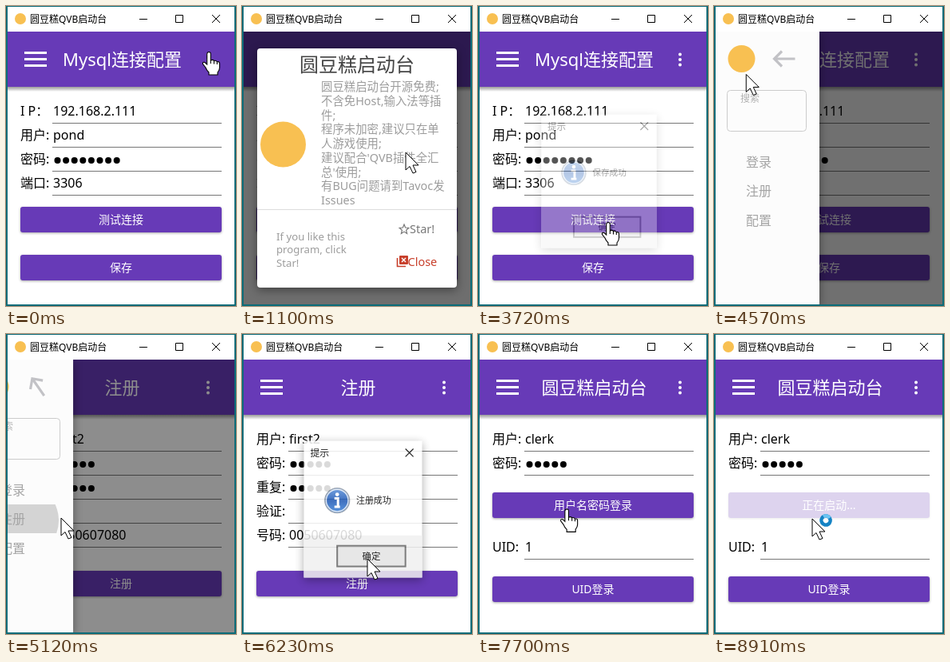
Recreate the animation shown at these times as an HTML page. Size 288 by 375 pixels, loop 9000 ms.

```html
<!DOCTYPE html>
<html lang="zh-CN">
<head>
<meta charset="utf-8">
<title>圆豆糕启动台</title>
<style>
html, body { margin: 0; width: 100%; height: 100%; overflow: hidden; background: #0b6b78; }
svg { display: block; width: 288px; height: 375px; }
text { font-family: "Noto Sans", "Noto Sans CJK SC", "Noto Sans CJK", sans-serif; white-space: pre; }
.btn { filter: drop-shadow(0 1.5px 1.5px rgba(0,0,0,.35)); }
.card { filter: drop-shadow(0 3px 6px rgba(0,0,0,.4)); }
</style>
</head>
<body>
<svg id="stage" viewBox="0 0 288 375"></svg>
<script>
const LOOP = 9000, FIRST = 170, STEP = 92.98;
const PURPLE = '#673ab7', YELLOW = '#f8c052', DRAWER_W = 132;

// ---- markup helpers ----
const text = (x, y, size, fill, str, extra = '') =>
  `<text x="${x}" y="${y}" font-size="${size}" fill="${fill}" ${extra}>${str}</text>`;
const mid = 'text-anchor="middle"', medium = 'font-weight="500"';
const rect = (x, y, w, h, fill, extra = '') =>
  `<rect x="${x}" y="${y}" width="${w}" height="${h}" fill="${fill}" ${extra}/>`;
const circle = (x, y, r, fill, extra = '') =>
  `<circle cx="${x}" cy="${y}" r="${r}" fill="${fill}" ${extra}/>`;
const line = (d, stroke, w = 1, extra = '') =>
  `<path d="${d}" fill="none" stroke="${stroke}" stroke-width="${w}" ${extra}/>`;
const group = (id, inner, extra = '') => `<g id="${id}" ${extra}>${inner}</g>`;

// A number as value means that many password bullets.
function field(label, value, y) {
  let body = '';
  if (typeof value === 'number') {
    for (let i = 0; i < value; i++) body += circle(64.5 + i * 10.6, y - 13, 4, '#000');
  } else body = text(59, y - 9, 16, '#000', value);
  return text(18, y - 9, 16, '#000', label) + body + rect(58, y, 212, 1, '#777');
}
const button = (id, y, label) => `<g class="btn" id="${id}">` +
  rect(18, y, 252, 32, PURPLE, 'rx="3"') + '</g>' +
  text(144, y + 21, 14, '#fff', label, mid + ` id="${id}Text"`);

const pages = {
  config: {
    title: 'Mysql连接配置',
    buttons: [251, 311],
    body: field('I P：', '192.168.2.111', 146) + field('用户:', 'pond', 176) +
      field('密码:', 8, 206) + field('端口:', '3306', 236) +
      button('test', 251, '测试连接') + button('save', 311, '保存')
  },
  register: {
    title: '注册',
    buttons: [296],
    body: field('用户:', 'first2', 146) + field('密码:', 5, 176) + field('重复:', 5, 206) +
      field('验证:', '', 236) + field('号码:', '0050607080', 266) + button('join', 296, '注册')
  },
  home: {
    title: '圆豆糕启动台',
    buttons: [198, 303],
    body: field('用户:', 'clerk', 146) + field('密码:', 5, 176) +
      button('login', 198, '用户名密码登录') + field('UID:', '1', 281) + button('uid', 303, 'UID登录')
  }
};

const notes = ['圆豆糕启动台开源免费;', '不含免Host,输入法等插', '件;', '程序未加密,建议只在单',
  '人游戏使用;', "建议配合'QVB插件全汇", "总'使用;", '有BUG问题请到Tavoc发', 'Issues'];

const about = `<g class="card">${rect(19, 53, 250, 299, '#fff', 'rx="4"')}</g>` +
  text(144, 82, 24, '#444', '圆豆糕启动台', mid) +
  circle(51.5, 173, 28.5, YELLOW) +
  notes.map((s, i) => text(99, 106 + i * 17.75, 14.4, '#9c9c9c', s)).join('') +
  rect(19, 254, 250, 1, '#ddd') +
  ['If you like this', 'program, click', 'Star!']
    .map((s, i) => text(43, 292.5 + i * 16.6, 13.2, '#9c9c9c', s)).join('') +
  line('M203 273l1.6 4 4.2 .4-3.200 2.800 1 4.200-3.600-2.300-3.600 2.300 1-4.200-3.200-2.800 4.200-.4z', '#777', 1.2) +
  text(210, 284, 14.5, '#777', 'Star!', medium) +
  rect(197, 312, 11, 11, '#c8402c', 'rx="1"') +
  line('M194.500 315V325.500H205', '#c8402c', 1.6) +
  line('M200 315l5 5m0-5l-5 5', '#fff', 1.4) +
  text(207.5, 325, 14.5, '#c8402c', 'Close', medium);

const rows = [['登录', 177], ['注册', 213], ['配置', 250]];
const drawer = `<g class="card">${rect(0, 32, DRAWER_W, 342, '#fcfcfc')}</g>` +
  circle(34.5, 66, 17, YELLOW) +
  group('back', line('M13.500 0H-12.500M-3-9.500L-12.500 0L-3 9.500', '#c2c2c6', 3.2)) +
  rect(16.5, 105.500, 99, 51, 'none', 'rx="4" stroke="#ccc"') +
  text(33, 120, 12, '#b0b0b0', '搜索') +
  `<clipPath id="row"><rect id="rowBox" x="8" width="116" height="36" rx="4"/></clipPath>` +
  `<g clip-path="url(#row)">${circle(0, 0, 0, '#d4d4d4', 'id="ripple"')}</g>` +
  rows.map(([s, y]) => text(40, y + 24, 16, '#a4a4a4', s)).join('');

const message = `<g class="card">${rect(77, 133, 149, 172, '#fff')}</g>` +
  rect(77, 252, 149, 53, '#f0f0f0') +
  text(85, 153, 12, '#000', '提示') + line('M205 143l10 10m0-10l-10 10', '#000', 1.2) +
  circle(119, 208, 15.5, 'url(#blue)', 'stroke="#8f9aa8" stroke-width="1.5"') +
  circle(119, 208, 13.9, 'none', 'stroke="#dfe8f4" stroke-width="1.4"') +
  circle(119, 200.5, 2.4, '#fff') +
  line('M115.500 205.500H120V215.500M115.500 216H122.500', '#fff', 3) +
  text(143, 212, 11, '#000', '', 'id="note"') +
  rect(119, 265, 86, 26, '#e3e3e3', 'stroke="#666" stroke-width="2"') +
  text(162, 282, 11.5, '#000', '确定', mid);

const pointer = line('M0 0V22L5 17.500L9 26L13 24.500L9 16H16Z', '#000', 1, 'id="arrow" style="fill:#fff"') +
  line('M-2.300 2Q-2-.5 0-.5Q2.300-.5 2.300 2V10Q5 8.500 6.500 10.500Q9 9.500 10.300 11.800Q13.500 11 13.500 14V19' +
    'Q13.500 22 11 25V28H0V25Q-3 22-4 19L-7.500 14.500Q-8 11.500-5 12.500L-2.300 15Z' +
    'M2.300 10V14M6.500 10.500V14.500M10.300 11.800V15', '#000', 1.1, 'id="hand" style="fill:#fff"') +
  group('spinner', circle(0, 0, 5.6, 'none', 'stroke="#1583c4" stroke-width="4.500"') +
    line('M0-5.600A5.600 5.600 0 0 1 5.600 0', '#6cc4f2', 4.5));

const stage = document.getElementById('stage');
stage.innerHTML = `<defs>
  <clipPath id="client"><rect x="2" y="32" width="284" height="341"/></clipPath>
  <linearGradient id="shade" x2="0" y2="1"><stop stop-opacity=".4"/><stop offset="1" stop-opacity="0"/></linearGradient>
  <linearGradient id="blue" x2="0" y2="1"><stop stop-color="#5d93dc"/><stop offset=".5" stop-color="#2059b4"/><stop offset="1" stop-color="#3f86dc"/></linearGradient>
  </defs>` +
  rect(0, 0, 288, 375, '#0b6b78') + rect(2, 1, 284, 372, '#fff') +
  circle(18, 16, 7, YELLOW) +
  group('frame', text(30, 21, 12, 'currentColor', '圆豆糕QVB启动台') +
    line('M167 16.500H177M212.500 11.500H221.500V20.500H212.500ZM258 11l10 10m0-10l-10 10', 'currentColor')) +
  '<g clip-path="url(#client)">' +
  Object.keys(pages).map(k => group(k, pages[k].body)).join('') +
  rect(2, 101, 284, 6, 'url(#shade)') + rect(2, 32, 284, 69, PURPLE) +
  line('M23 58.500H51M23 66.500H51M23 74.500H51', '#fff', 3) +
  text(145.5, 75, 22, '#fff', '', `${mid} ${medium} id="heading"`) +
  [60.5, 67, 73.5].map(y => circle(253, y, 2, '#fff')).join('') +
  rect(2, 32, 284, 341, '#000', 'id="scrim"') +
  group('about', about) + group('drawer', drawer) + '</g>' +
  group('message', message) + group('pointer', pointer);

const el = {};
stage.querySelectorAll('[id]').forEach(n => el[n.id] = n);
const set = (id, attrs) => { for (const k in attrs) el[id].setAttribute(k, attrs[k]); };
const show = (id, on) => { el[id].style.display = on ? '' : 'none'; };

// ---- timeline ----
const clamp = v => Math.max(0, Math.min(1, v));
const ramp = (t, start, dur) => clamp((t - start) / dur);
const smooth = p => p * p * (3 - 2 * p);

const path = [
  [0, 254, 58], [650, 254, 58], [1100, 205, 183], [1400, 215, 318], [1600, 215, 318],
  [2050, 160, 265], [2300, 160, 265], [2500, 157, 281], [2750, 157, 281],
  [3000, 150, 325], [3250, 150, 325], [3480, 163, 271], [3750, 163, 271],
  [4150, 36, 64], [4450, 36, 64], [4850, 69, 230], [5150, 69, 230],
  [5500, 145, 310], [5750, 145, 310], [6000, 157, 281], [6300, 157, 281],
  [6700, 36, 64], [6930, 36, 64], [7130, 57, 198], [7300, 57, 198],
  [7850, 123, 224], [8150, 123, 224], [8400, 123, 231], [9000, 123, 231]
];
const messages = [
  { open: 2200, close: 2680, note: '连接成功', btn: 'test' },
  { open: 3220, close: 3640, note: '保存成功', btn: 'save' },
  { open: 5640, close: 6200, note: '注册成功', btn: 'join' }
];
const menus = [
  { open: 4220, close: 4989, row: 1, x: 66 },
  { open: 6760, close: 7200, row: 0, x: 54 }
];
const ABOUT = { open: 350, close: 1500 }, LAUNCH = 8050, SLIDE_OUT = 300;

const isOpen = (t, e, tail = 0) => t >= e.open && t < e.close + tail;
const level = (t, e, inDur, outDur) => smooth(ramp(t, e.open, inDur)) * (1 - ramp(t, e.close, outDur));

function pointerAt(t) {
  let i = 1;
  while (i < path.length - 1 && path[i][0] < t) i++;
  const a = path[i - 1], b = path[i], p = smooth(ramp(t, a[0], b[0] - a[0]));
  return [a[1] + (b[1] - a[1]) * p, a[2] + (b[2] - a[2]) * p];
}

function isHand(t, x, y, page) {
  if (messages.some(m => isOpen(t, m)) || menus.some(m => isOpen(t, m, SLIDE_OUT))) return false;
  if (isOpen(t, ABOUT)) return x > 190 && x < 250 && y > 305 && y < 332;
  if (y > 45 && y < 88) return x < 58 || x > 235;
  return x > 18 && x < 270 && pages[page].buttons.some(b => y >= b && y < b + 32);
}

function draw(t) {
  const page = t < menus[0].close ? 'config' : t < menus[1].close ? 'register' : 'home';
  for (const k in pages) show(k, k === page);
  el.heading.textContent = pages[page].title;

  const a = level(t, ABOUT, 150, 90), s = .8 + .2 * a;
  show('about', a > 0);
  set('about', { opacity: a, transform: `translate(144 202) scale(${s}) translate(-144 -202)` });

  const menu = t < 6000 ? menus[0] : menus[1];
  const d = level(t, menu, 250, SLIDE_OUT), off = (1 - d) * DRAWER_W;
  show('drawer', d > 0);
  set('drawer', { transform: `translate(${-off} 0)` });
  set('back', { transform: `translate(88 66) rotate(${off * 1.15})` });
  const rowY = rows[menu.row][1];
  set('rowBox', { y: rowY });
  set('ripple', { cx: menu.x, cy: rowY + 20, r: t < menu.close ? 0 : off });
  set('scrim', { opacity: Math.max(a * .57, Math.sqrt(d) * .56) });

  const msg = messages.find(m => isOpen(t, m, 95));
  show('message', msg);
  if (msg) {
    const m = clamp(.5 + ramp(t, msg.open, 90)) * (1 - ramp(t, msg.close, 95));
    el.note.textContent = msg.note;
    set('message', { opacity: m, transform: `translate(151 219) scale(${.955 + .045 * m}) translate(-151 -219)` });
  }
  for (const m of messages)
    el[m.btn].firstChild.setAttribute('fill', t > m.open - 90 && t < m.close ? '#7c53c1' : PURPLE);
  el.frame.style.color = messages.some(m => isOpen(t, m)) ? '#999' : '#000';

  const busy = t >= LAUNCH;
  set('login', { opacity: busy ? .22 : 1 });
  el.loginText.textContent = busy ? '正在启动...' : '用户名密码登录';

  const [x, y] = pointerAt(t), hand = !busy && isHand(t, x, y, page);
  set('pointer', { transform: `translate(${x} ${y})` });
  show('hand', hand);
  show('arrow', !hand);
  show('spinner', busy);
  set('spinner', { transform: `translate(17 2) rotate(${t * .36})` });
}

// The picture advances in even steps after a longer first hold.
const start = performance.now();
function tick() {
  const t = (performance.now() - start) % LOOP;
  draw(t < FIRST ? 0 : FIRST + Math.floor((t - FIRST) / STEP + .01) * STEP);
  requestAnimationFrame(tick);
}
tick();
</script>
</body>
</html>
```
